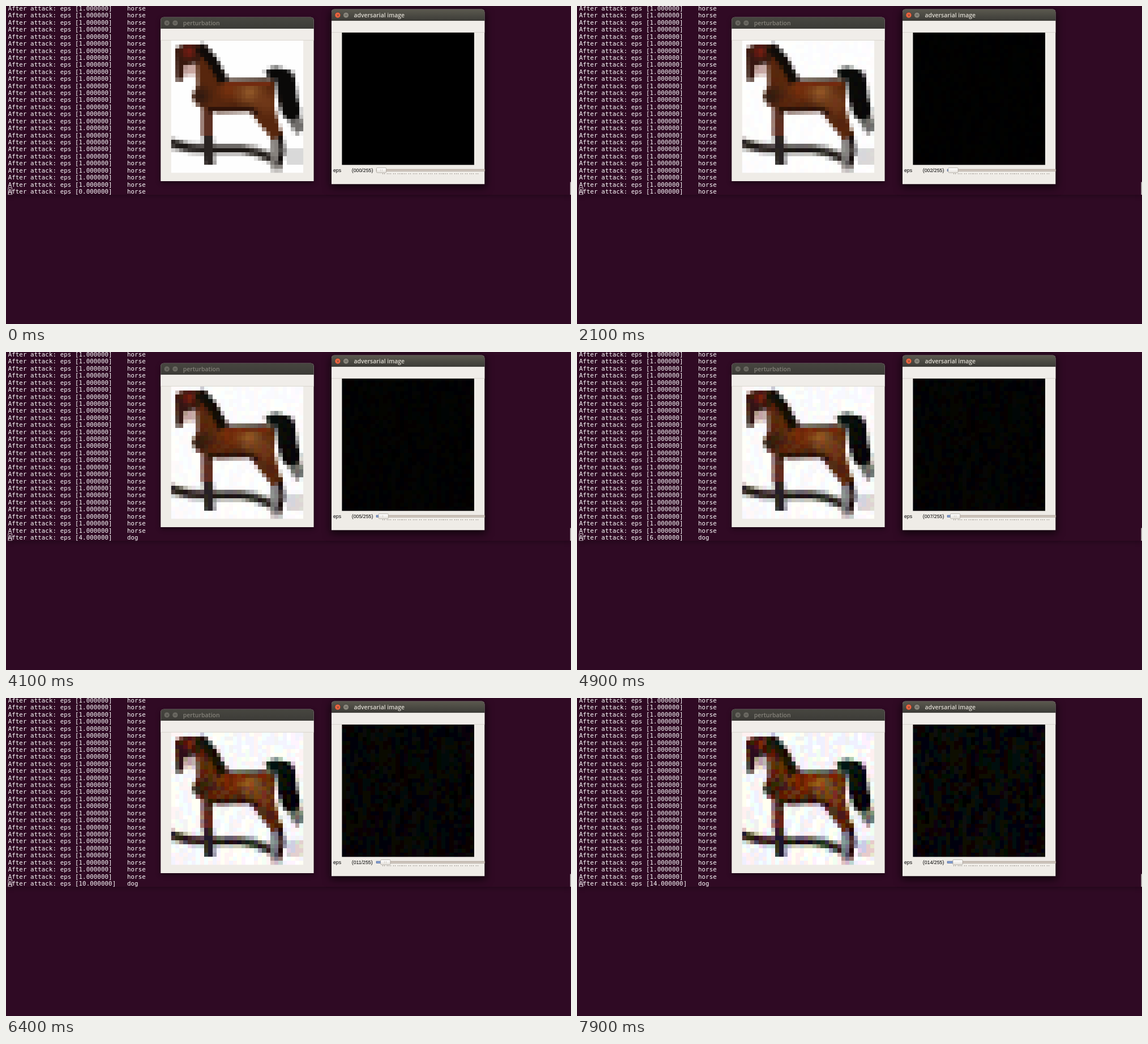
Animation, 998 px wide and 561 px high, one loop 8 s. Source, as an HTML page with a canvas:

```html
<!DOCTYPE html>
<html lang="en">
<head>
<meta charset="utf-8">
<title>Perturbation demo</title>
<style>
  html, body { margin: 0; width: 100%; height: 100%; overflow: hidden; background: #300a24; }
  body * { position: absolute; box-sizing: border-box; }
  /* a 1366 x 768 desktop shown 998 wide */
  #stage { left: 0; top: 0; width: 1366px; height: 768px; overflow: hidden; background: #2f0a24;
           transform: scale(calc(998 / 1366)); transform-origin: 0 0; }
  #term { width: 1366px; height: 456px; background: #300a24; box-shadow: 0 3px 12px #0006; overflow: hidden; }
  #log { left: 5px; bottom: 0; margin: 0; color: #fff; white-space: pre; letter-spacing: .17px;
         font: 14.67px/17px "DejaVu Sans Mono", monospace; }
  #cursor { left: 5px; bottom: 0; width: 10px; height: 18px; border: 1px solid #fff; }
  #bar { right: 0; bottom: 0; width: 2px; height: 31px; background: #ccc8c4; }
  .win { width: 370px; border-radius: 7px 7px 0 0; background: #efece7; box-shadow: 0 4px 12px #0007; }
  .win.active { box-shadow: 0 5px 19px 3px #000a; }
  .title { width: 370px; height: 28px; border-radius: 7px 7px 0 0; padding-left: 54px; color: #85827a;
           background: linear-gradient(#474640, #3c3b37); font: 600 14.3px/28px "Open Sans", sans-serif; }
  .active .title { color: #dfdbd2; background: linear-gradient(#5b594f, #3c3b37); }
  .tools { top: 28px; width: 370px; height: 28px; background: #f0ede9; border-bottom: 1px solid #d2cdc6; }
  .win svg { left: 5px; top: 4px; width: 41px; height: 21px; fill: none; stroke: #3a3935; }
  canvas { left: 25px; top: 56px; width: 320px; height: 320px; image-rendering: pixelated; }
  .small { font: 12px/14px "Liberation Sans", Arial, sans-serif; white-space: pre; color: #000; }
  #status { top: 382px; width: 370px; height: 13px; overflow: hidden; }
  #groove, #filled { left: 108px; top: 386px; height: 5px; border: 1px solid #988d84; background: #d8cfc6; }
  #groove { width: 263px; }
  #filled { border-color: #566b9c; background: #86a6dc; }
  #knob { top: 382px; width: 25px; height: 13px; border: 1px solid #a59f97; border-radius: 3px;
          background: repeating-linear-gradient(90deg, #0000 0 3px, #d3cec7 3px 4px) 6px 3px / 10px 5px no-repeat,
                      linear-gradient(#fff, #e6e2dc); }
  #ticks { left: 120px; top: 396px; width: 238px; height: 2px;
           background: repeating-linear-gradient(90deg, #8d8780 0 1px, #0000 1px 3.7px); }
</style>
</head>
<body>
<div id="stage">
  <div id="term"><pre id="log"></pre><div id="cursor"></div><div id="bar"></div></div>

  <div class="win" style="left:374px;top:27px;height:396px">
    <div class="title">perturbation</div>
    <svg><g fill="#6a6861"><circle cx="10" cy="10" r="7"/><circle cx="30" cy="10" r="7"/></g>
      <path d="M8 8l5 5m0-5l-5 5M27 10h6"/></svg>
    <div class="tools"></div>
    <canvas id="photo" width="32" height="32"></canvas>
    <div id="status" class="small">
      <span style="left:1px">(x=13, y=47) ~</span>
      <span id="r" style="left:82px;color:#f00"></span>
      <span id="g" style="left:111px;color:#008000"></span>
      <span id="b" style="left:140px;color:#00f"></span>
    </div>
  </div>

  <div class="win active" style="left:787px;top:8px;height:422px">
    <div class="title">adversarial image</div>
    <svg><circle cx="10" cy="10" r="7" fill="#ee6540"/><circle cx="30" cy="10" r="7" fill="#89867c"/>
      <path d="M8 8l5 5m0-5l-5 5M27 10h6"/></svg>
    <div class="tools"></div>
    <canvas id="noise" width="32" height="32"></canvas>
    <span class="small" style="left:4px;top:382px">eps</span>
    <span class="small" style="left:49px;top:382px" id="value"></span>
    <div id="groove"></div><div id="filled"></div><div id="ticks"></div><div id="knob"></div>
  </div>
</div>

<script>
const $ = id => document.getElementById(id);
const N = 32, TICK = 100, TICKS = 80;

// ticks at which the slider gains one step, and at which the picture is recomputed
const MOVES = [4, 17, 24, 36, 41, 45, 49, 54, 58, 61, 64, 67, 71, 74];
const REDRAWS = [5.5, 21, 26.5, 36.5, 41.5, 47, 53, 57.5, 63, 67.5, 73, 78];
const LOG_LAG = 0.5;

const sliderAt = t => MOVES.filter(m => m <= t).length;
const epsAt = t => sliderAt(Math.max(0, ...REDRAWS.filter(r => r <= t)));

const photo = $('photo').getContext('2d', { willReadFrequently: true });
const noise = $('noise').getContext('2d');

function fill(color, path) {
  photo.fillStyle = color;
  photo.fill(new Path2D(path));
}
function line(color, width, path) {
  photo.strokeStyle = color;
  photo.lineWidth = width;
  photo.stroke(new Path2D(path));
}
// soft round tint
function spot(rgb, x, y, r) {
  const g = photo.createRadialGradient(x, y, 0, x, y, r);
  g.addColorStop(0, `rgba(${rgb},.85)`);
  g.addColorStop(1, `rgba(${rgb},0)`);
  photo.fillStyle = g;
  photo.fillRect(x - r, y - r, 2 * r, 2 * r);
}

function drawHorse() {
  const rocker = 'M-1 24.4Q4 26.3 9 26.3T17 26.3 26.5 29.5';
  fill('#d9d9d9', 'M28 26h4v4h-4z');
  line('#8a8683', 2.6, rocker);
  line('#1d1815', 1.3, rocker);
  // tail
  line('#6f6c6a', 3, 'M29 17L31.5 22');
  line('#0a0908', 3, 'M23.5 8.9Q25 7.6 27 8.4');
  photo.lineCap = 'round';
  line('#0a0908', 4.6, 'M27.6 9.4L28.2 14 29 17');
  photo.lineCap = 'butt';
  // legs
  line('#87827e', 2.6, 'M25.3 22L25.6 31.5');
  line('#14100f', 1.1, 'M26.3 22L27 27 26 30');
  line('#5c3022', 2.6, 'M8.7 16V23');
  line('#2a2422', 2.3, 'M8.9 23L9.3 30');
  // torso, neck, head
  fill('#57260d', 'M6 1L6.3 11 5 13.5 6 15.5 11 17.4 19 17.2 24.5 24 26.8 23 25 16V10L23.5 9.1 13.5 9.3 8 1Z');
  fill('#38190f', 'M1 2L3 1H7V5.5L4 6 2.8 9.8H1.2Z');
  fill('#c9a8a2', 'M3.2 6H6V8.5H3.2Z');

  // shading stays inside the shapes
  photo.globalCompositeOperation = 'source-atop';
  spot('135,28,20', 4.3, 2.8, 2.2);
  spot('38,22,17', 7, 13.5, 3.5);
  spot('128,52,14', 14, 11.8, 3.4);
  spot('158,98,46', 19, 12.5, 4.5);
  spot('120,62,28', 23, 15, 4);
  line('#240e08cc', 1.5, 'M9 16.8L19 16.5 21 18');
  line('#722b10', 1, 'M13.5 10.5H24');
  line('#61524a', 1, 'M13 9.4H24');
  photo.globalCompositeOperation = 'source-over';

  line('#0f0a08', 2.5, 'M7 1.5Q10 4 12.8 10');
  photo.globalCompositeOperation = 'destination-over';
  fill('#fefefe', 'M0 0H32V32H0Z');
  photo.globalCompositeOperation = 'source-over';
}

// a sign for every cell and channel, sometimes repeated from the cell above
function makeSigns() {
  let seed = 7;
  const rnd = () => (seed = seed * 16807 % 2147483647) / 2147483647;
  const signs = [];
  for (let i = 0; i < N * N; i++) {
    const above = signs[i - N];
    const red = rnd() < 0.5 ? 1 : -1;
    const fresh = [red, rnd() < 0.5 ? red : -red, rnd() < 0.25 ? red : -red];
    signs.push(above && rnd() < 0.3 ? above : fresh);
  }
  return signs;
}

drawHorse();
const base = photo.getImageData(0, 0, N, N).data;
const signs = makeSigns();

function drawImages(eps) {
  const a = new ImageData(N, N), b = new ImageData(N, N);
  signs.forEach((s, i) => {
    for (let c = 0; c < 3; c++) {
      a.data[4 * i + c] = base[4 * i + c] + eps * s[c];
      b.data[4 * i + c] = eps * s[c];
    }
    a.data[4 * i + 3] = b.data[4 * i + 3] = 255;
  });
  photo.putImageData(a, 0, 0);
  noise.putImageData(b, 0, 0);
  $('r').textContent = 'R:' + (64 - eps);
  $('g').textContent = 'G:' + (58 - eps);
  $('b').textContent = 'B:' + (59 - eps);
}

function drawSlider(v) {
  const shift = v * 237 / 255;
  $('value').textContent = `(${String(v).padStart(3, '0')}/255)`;
  $('knob').style.left = 108 + shift + 'px';
  $('filled').style.width = shift + 2 + 'px';
  $('filled').hidden = !v;
}

const row = eps => `After attack: eps [${eps.toFixed(6)}]`.padEnd(32) + (eps < 3 ? 'horse' : 'dog');
const history = (row(1) + '\n').repeat(26);
const drawLog = eps => { $('log').textContent = history + row(eps); };

const start = performance.now();
let shown;
function frame() {
  const t = Math.floor((performance.now() - start) / TICK) % TICKS;
  if (t !== shown) {
    drawSlider(sliderAt(t));
    drawImages(epsAt(t));
    drawLog(epsAt(t - LOG_LAG));
    shown = t;
  }
  requestAnimationFrame(frame);
}
frame();
</script>
</body>
</html>
```
